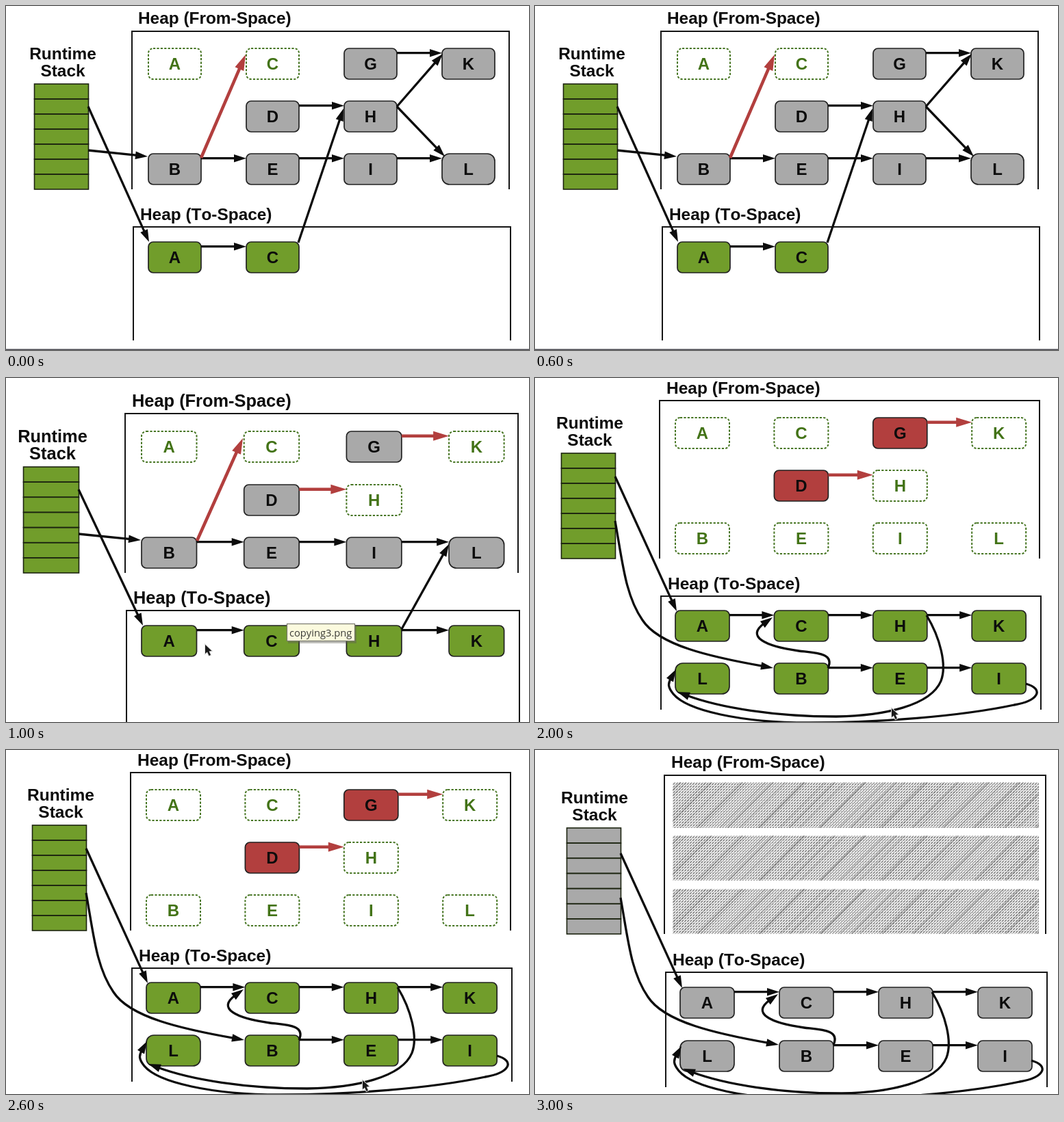
An HTML page with a canvas that plays this animation: 764x503 px, repeating every 4 s.

```html
<!DOCTYPE html>
<html lang="en">
<head>
<meta charset="utf-8">
<title>Copying collector</title>
<style>
html, body { margin: 0; width: 100%; height: 100%; overflow: hidden; background: #fff; }
canvas { display: block; }
</style>
</head>
<body>
<canvas id="stage" width="764" height="503"></canvas>
<script>
const ctx = document.getElementById('stage').getContext('2d');
const GREEN = '#719d2b', GRAY = '#a9a9a9', RED = '#b23f3e', INK = '#0c0c0c';
const SANS = '"Liberation Sans", Arial, sans-serif';
const FILLS = { g: GRAY, v: GREEN, r: RED };

// Node codes: letter, column, row (3 and 4 lie in To-Space), style (d = moved away).
// Hops: column, row, colour of an arrow to the next column.
const scenes = [
  {
    x: 208, pitch: 143, w: 77, rows: [62, 139, 216, 345], size: 24.4,
    stack: [41, 114, 79, 154], label: [83, 78],
    from: [184, 37, 735, 268], to: [186, 323, 737, 489],
    heads: [193, 26, 196, 313], fill: GREEN,
    nodes: 'A00d C10d G20g K30g D11g H21g B02g E12g I22g L32g A03v C13v',
    hops: '20k 11k 02k 12k 22k 03k',
    extra() {
      arrow(INK, [120, 147], [209, 345]);
      arrow(INK, [120, 211], [207, 220]);
      arrow(INK, [571, 147], [638, 70]);
      arrow(INK, [571, 147], [641, 220]);
      arrow(INK, [427, 346], [493, 150]);
      arrow(RED, [285, 222], [350, 71]);
      ctx.fillStyle = '#4b4b52';
      ctx.fillRect(0, 501.5, 764, 1.5);
    }
  },
  {
    x: 198, pitch: 149.7, w: 80.5, rows: [78, 156, 233, 362], size: 25.4,
    stack: [25, 130, 81, 155], label: [68, 94],
    from: [174, 52, 748, 285], to: [176, 340, 750, 510],
    heads: [184, 42, 186, 330], fill: GREEN,
    nodes: 'A00d C10d G20g K30d D11g H21d B02g E12g I22g L32g A03v C13v H23v K33v',
    hops: '20r 11r 02k 12k 22k 03k 13k 23k',
    extra() {
      arrow(INK, [106, 163], [200, 362]);
      arrow(INK, [106, 228], [197, 237]);
      arrow(INK, [578, 367], [647, 243]);
      arrow(RED, [279, 238], [346, 88]);
      tooltip();
      cursor(291, 390);
    }
  },
  {
    x: 205, pitch: 144.4, w: 79, rows: [58, 135, 212, 340, 417], size: 24.5,
    stack: [38, 110, 79, 154], label: [80, 74],
    from: [182, 33, 737, 264], to: [184, 319, 739, 485],
    heads: [192, 23, 194, 309], fill: GREEN,
    nodes: 'A00d C10d G20r K30d D11r H21d B02d E12d I22d L32d ' +
      'A03v C13v H23v K33v L04v B14v E24v I34v',
    hops: '20r 11r 03k 13k 23k 14k 24k',
    extra() {
      links(0, 0);
      cursor(521, 483);
    }
  },
  {
    x: 212, pitch: 145, w: 79, rows: [0, 0, 0, 347, 425], size: 24.5,
    stack: [46, 114, 79, 155], label: [87, 78],
    from: [189, 37, 746, 269], to: [191, 325, 748, 493],
    heads: [199, 26, 201, 315], fill: GRAY,
    nodes: 'A03g C13g H23g K33g L04g B14g E24g I34g',
    hops: '03k 13k 23k 14k 24k',
    extra() {
      hatch(47, 67);
      hatch(125, 66);
      hatch(203, 66);
      links(8, 7);
    }
  }
];

function text(str, x, y, size, align, color = INK) {
  ctx.font = `bold ${size}px ${SANS}`;
  ctx.fontKerning = 'none';
  ctx.textAlign = align;
  ctx.fillStyle = color;
  ctx.fillText(str, x, y);
}

// Each part after the start is a line end (2 numbers) or a cubic (6 numbers).
function arrow(color, start, ...parts) {
  const red = color === RED;
  const len = red ? 23 : 18, half = red ? 7 : 5.8;
  const last = parts[parts.length - 1], n = last.length;
  const [tx, ty] = last.slice(-2);
  const [px, py] = n > 2 ? last.slice(2, 4) : start;
  const angle = Math.atan2(ty - py, tx - px);
  ctx.strokeStyle = ctx.fillStyle = color;
  ctx.lineWidth = red ? 4.6 : 3.3;
  ctx.beginPath();
  ctx.moveTo(...start);
  for (const part of parts) {
    const p = part.slice();
    if (part === last) {
      p[n - 2] -= Math.cos(angle) * (len - 3);
      p[n - 1] -= Math.sin(angle) * (len - 3);
    }
    if (n > 2) ctx.bezierCurveTo(...p);
    else ctx.lineTo(...p);
  }
  ctx.stroke();
  ctx.save();
  ctx.translate(tx, ty);
  ctx.rotate(angle);
  ctx.beginPath();
  ctx.moveTo(0, 0);
  ctx.lineTo(-len, -half);
  ctx.lineTo(-len, half);
  ctx.fill();
  ctx.restore();
}

function links(dx, dy) {
  ctx.save();
  ctx.translate(dx, dy);
  arrow(INK, [117, 144], [207, 341]);
  arrow(INK, [117, 209], [128, 270, 132, 318, 157, 354], [181, 391, 257, 408, 348, 424]);
  arrow(INK, [428, 424], [438, 402, 410, 402, 385, 399], [335, 392, 308, 378, 347, 350]);
  arrow(INK, [572, 347], [592, 380, 602, 420, 593, 443],
    [578, 479, 510, 494, 440, 495], [350, 495, 270, 482, 208, 459]);
  arrow(INK, [717, 447], [745, 455, 735, 472, 700, 478],
    [620, 495, 500, 504, 400, 504], [300, 504, 222, 486, 202, 462],
    [194, 452, 194, 447, 206, 426]);
  ctx.restore();
}

function node(s, [letter, col, row, style]) {
  const x = s.x + col * s.pitch, y = s.rows[row], moved = style === 'd';
  ctx.beginPath();
  ctx.roundRect(x, y, s.w, 45, letter === 'L' && !moved ? 11 : 7);
  ctx.fillStyle = FILLS[style] || '#fff';
  ctx.fill();
  ctx.setLineDash(moved ? [3.2, 2.2] : []);
  ctx.lineWidth = moved ? 2 : 1.7;
  ctx.strokeStyle = moved ? '#467522' : '#222';
  ctx.stroke();
  ctx.setLineDash([]);
  text(letter, x + s.w / 2, y + 31, 24, 'center', moved ? '#437317' : INK);
}

function hop(s, [col, row, color]) {
  const x = s.x + col * s.pitch, y = s.rows[row] + 6.7;
  arrow(color === 'r' ? RED : INK, [x + s.w, y], [x + s.pitch, y]);
}

function space([l, t, r, b]) {
  ctx.strokeStyle = '#151515';
  ctx.lineWidth = 2;
  ctx.beginPath();
  ctx.moveTo(l, b);
  ctx.lineTo(l, t);
  ctx.lineTo(r, t);
  ctx.lineTo(r, b);
  ctx.stroke();
}

function drawStack([x, y, w, h], fill) {
  ctx.fillStyle = fill;
  ctx.fillRect(x, y, w, h);
  ctx.strokeStyle = '#1c2410';
  ctx.lineWidth = 1.6;
  for (let i = 0; i < 7; i++) ctx.strokeRect(x + .5, y + i * h / 7, w, h / 7);
}

function slants(x, y, w, h, step, width, color) {
  ctx.strokeStyle = color;
  ctx.lineWidth = width;
  ctx.beginPath();
  for (let k = x; k < x + w + h; k += step) {
    ctx.moveTo(k, y);
    ctx.lineTo(k - h, y + h);
  }
  ctx.stroke();
}

function hatch(y, h) {
  const x = 201, w = 535;
  ctx.save();
  ctx.beginPath();
  ctx.rect(x, y, w, h);
  ctx.clip();
  ctx.fillStyle = '#eaeaea';
  ctx.fillRect(x, y, w, h);
  slants(x, y, w, h, 4.1, 1.4, '#747474');
  ctx.fillStyle = 'rgba(255,255,255,.5)';
  for (let i = 0; i < h; i += 4) ctx.fillRect(x, y + i, w, 1.4);
  for (let i = 0; i < w; i += 4) ctx.fillRect(x + i, y, 1.2, h);
  slants(x + 12, y, w, h, 45, 2.4, 'rgba(50,50,50,.25)');
  slants(x + 20, y, w, h, 29, 1.6, 'rgba(50,50,50,.2)');
  ctx.restore();
}

function tooltip() {
  ctx.fillStyle = 'rgba(90,90,80,.4)';
  ctx.fillRect(412, 362, 100, 26);
  ctx.fillStyle = '#fbfade';
  ctx.fillRect(410, 359, 100, 26);
  ctx.strokeStyle = '#77776c';
  ctx.lineWidth = 1.2;
  ctx.strokeRect(410.5, 359.5, 99, 25);
  ctx.font = '14.7px "Open Sans", "Noto Sans", sans-serif';
  ctx.textAlign = 'left';
  ctx.fillStyle = '#3c3c38';
  ctx.fillText('copying3.png', 414, 378);
}

function cursor(x, y) {
  ctx.save();
  ctx.translate(x, y);
  ctx.beginPath();
  ctx.moveTo(0, 0);
  for (const p of [[0, 13], [3, 10.5], [5.5, 16], [8, 15], [5.5, 9.5], [9.5, 9]]) ctx.lineTo(...p);
  ctx.closePath();
  ctx.strokeStyle = '#ddd';
  ctx.lineWidth = 2;
  ctx.stroke();
  ctx.fillStyle = '#1a1a1a';
  ctx.fill();
  ctx.restore();
}

function draw(s) {
  ctx.fillStyle = '#fff';
  ctx.fillRect(0, 0, 764, 503);
  space(s.from);
  space(s.to);
  drawStack(s.stack, s.fill);
  const [fx, fy, tx, ty] = s.heads, [lx, ly] = s.label;
  text('Heap (From-Space)', fx, fy, s.size, 'left');
  text('Heap (To-Space)', tx, ty, s.size, 'left');
  text('Runtime', lx, ly, s.size, 'center');
  text('Stack', lx, ly + 25, s.size, 'center');
  s.nodes.split(' ').forEach(code => node(s, code));
  s.hops.split(' ').forEach(code => hop(s, code));
  s.extra();
}

const began = performance.now();
let shown = -1;
function tick() {
  const i = Math.floor((performance.now() - began) / 1000) % scenes.length;
  if (i !== shown) draw(scenes[shown = i]);
  requestAnimationFrame(tick);
}
tick();
</script>
</body>
</html>
```
